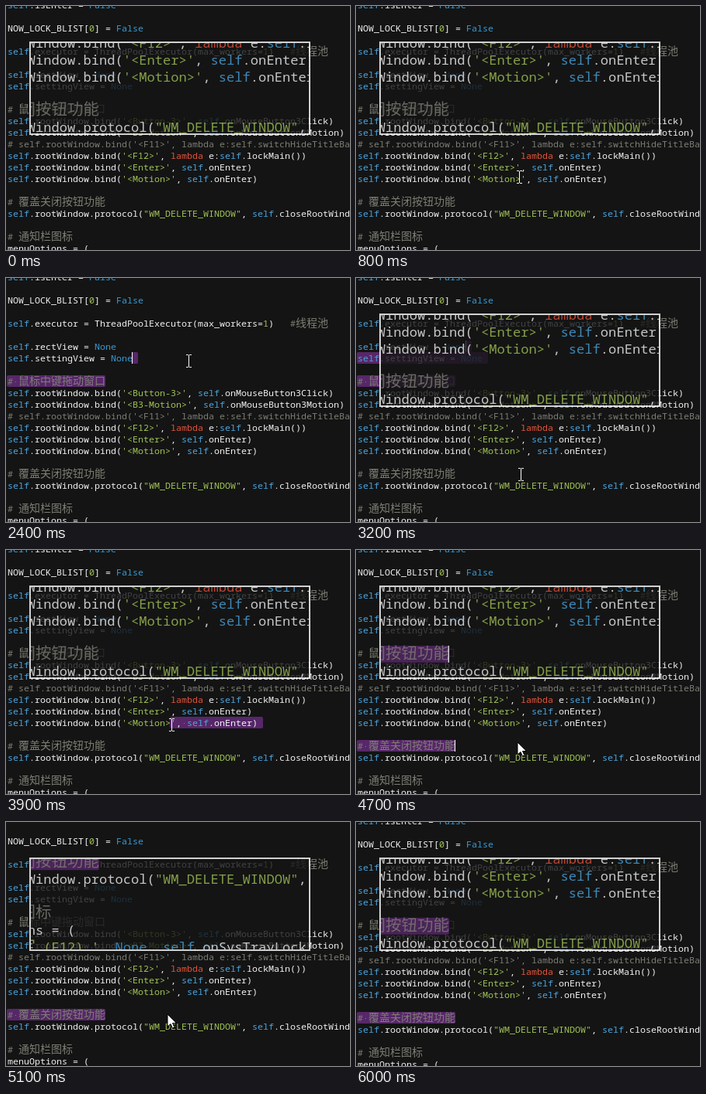
An HTML page with a canvas that plays this animation: 443x316 px, repeating every 6100 ms.

```html
<!DOCTYPE html>
<html lang="en">
<head>
<meta charset="utf-8">
<title>Editor with magnifier</title>
<style>
html, body { margin: 0; width: 100%; height: 100%; overflow: hidden; background: #141414; }
canvas { display: block; }
</style>
</head>
<body>
<canvas id="stage" width="443" height="316"></canvas>
<script>
const ctx = document.getElementById('stage').getContext('2d');
const W = 443, H = 316, LOOP = 6100, STEP = 100;
const COL = 7, ROW = 15, LEFT = 2, BG = '#141414', ZOOM = 1.465;
const LATIN = '11.667px "Noto Sans Mono", "DejaVu Sans Mono", monospace';
const HAN = '14px "Noto Sans CJK SC", "Noto Sans CJK", sans-serif';
const lines = `self.isEnter = False

NOW_LOCK_BLIST[0] = False

self.executor = ThreadPoolExecutor(max_workers=1)   #线程池

self.rectView = None
self.settingView = None

# 鼠标中键拖动窗口
self.rootWindow.bind('<Button-3>', self.onMouseButton3Click)
self.rootWindow.bind('<B3-Motion>', self.onMouseButton3Motion)
# self.rootWindow.bind('<F11>', lambda e:self.switchHideTitleBar())
self.rootWindow.bind('<F12>', lambda e:self.lockMain())
self.rootWindow.bind('<Enter>', self.onEnter)
self.rootWindow.bind('<Motion>', self.onEnter)

# 覆盖关闭按钮功能
self.rootWindow.protocol("WM_DELETE_WINDOW", self.closeRootWindow)

# 通知栏图标
menuOptions = (
    ('锁定 (F12).', None, self.onSysTrayLock),
    ('设置', None, self.onSysTraySetting),
    ('退出', None, self.closeRootWindow),
)`.split('\n');

// Groups: comment, string or number, self, lambda, constant
const TOKEN = /(#.*)|('[^']*'|"[^"]*"|\b\d+\b)|\b(self)\b|\b(lambda)\b|\b(None|False)\b|[^#'"\w]+|\w+/g;
const COLORS = ['#f2f2f2', '#7d7d74', '#a0c455', '#4aa5e0', '#e4533a', '#3a9ad4'];
const isWide = ch => ch > '\u2e80';
const cols = s => [...s].reduce((n, ch) => n + (isWide(ch) ? 2 : 1), 0);

// Each glyph with its grid column and colour
const glyphs = lines.map(line => {
  const out = [];
  let col = 0;
  for (const m of line.matchAll(TOKEN)) {
    const kind = m.slice(1).findIndex(Boolean) + 1;
    for (const ch of m[0]) {
      if (ch !== ' ') out.push({ ch, col, color: COLORS[kind] });
      col += cols(ch);
    }
  }
  return out;
});

// Timelines: [start, ...values], each held until the next entry
const scrolls = [[0, 0], [4800, 20], [4900, 44], [5000, 57], [5100, 4], [5200, 0]];
const lens = [[0, 1], [400, 0], [700, 1], [1000, 0], [3100, 1]];
const blink = [[0, 0], [1300, 1], [3400, 0], [4300, 1], [4900, 0], [5400, 1], [5900, 0]];
// caret line, caret column, anchor line, anchor column
const carets = [
  [0, 7, 23, 7, 23], [1700, 9, 18, 9, 18], [2200, 8, 0, 9, 18], [2300, 7, 23, 9, 18],
  [2600, 6, 20, 9, 18], [3400, 16, 0, 16, 0], [3900, 15, 30, 16, 0],
  [4000, 14, 30, 16, 0], [4200, 15, 30, 16, 0], [4300, 17, 18, 17, 0]
];
// x, y, shape
const mouse = [
  [0, 0, 0, ''], [200, 437, 46, 'beam'], [300, 404, 78, 'beam'], [400, 330, 100, 'beam'],
  [600, 270, 120, 'beam'], [700, 225, 190, 'beam'], [800, 210, 221, 'beam'],
  [900, 222, 180, 'beam'], [1000, 236, 115, 'beam'], [1100, 237, 97, 'beam'],
  [1500, 237, 128, 'beam'], [2200, 236, 119, 'beam'], [2300, 235, 107, 'beam'],
  [2600, 238, 91, 'beam'], [2800, 242, 100, 'beam'], [3000, 232, 150, 'beam'],
  [3100, 216, 210, 'beam'], [3200, 212, 254, 'beam'], [3400, 212, 250, 'beam'],
  [3500, 212, 243, 'beam'], [3600, 212, 239, 'beam'], [3800, 213, 234, 'beam'],
  [3900, 213, 226, 'beam'], [4000, 213, 212, 'beam'], [4200, 212, 238, 'beam'],
  [4300, 212, 255, 'beam'], [4600, 208, 249, 'arrow'], [5300, 250, 248, 'arrow'],
  [5400, 328, 247, 'arrow'], [5500, 0, 0, '']
];
const at = (keys, t) => keys.findLast(k => k[0] <= t).slice(1);
const midY = i => i * ROW - 1;

function drawSelection([l0, c0, l1, c1]) {
  for (let i = l0; i <= l1; i++) {
    const from = i === l0 ? c0 : 0;
    const to = i === l1 ? c1 : cols(lines[i]) + 1;
    if (!lines[i] || to <= from) continue;
    ctx.fillStyle = '#572769';
    ctx.beginPath();
    ctx.roundRect(LEFT + from * COL - 1, midY(i) - 8, (to - from) * COL + 1, ROW, 2);
    ctx.fill();
    // Selected spaces show as dots
    ctx.fillStyle = '#8f7a98';
    for (let c = from; c < to; c++) {
      if (lines[i][c] === ' ') ctx.fillRect(LEFT + c * COL + 3, midY(i), 1, 1);
    }
  }
}

function drawPage(t) {
  const [cl, cc, al, ac] = at(carets, t);
  ctx.fillStyle = BG;
  ctx.fillRect(0, 0, W, H);
  ctx.save();
  ctx.translate(0, -at(scrolls, t)[0]);
  drawSelection(cl < al ? [cl, cc, al, ac] : [al, ac, cl, cc]);
  glyphs.forEach((row, i) => {
    for (const g of row) {
      ctx.font = isWide(g.ch) ? HAN : LATIN;
      ctx.fillStyle = g.color;
      ctx.fillText(g.ch, LEFT + g.col * COL, midY(i) + 4);
    }
  });
  if (at(blink, t)[0]) {
    ctx.fillStyle = '#fff';
    ctx.fillRect(LEFT + cc * COL - 1, midY(cl) - 8, 1, ROW);
  }
  ctx.restore();
}

// The lens shows the page as it was one step earlier
function drawLens(t) {
  ctx.save();
  ctx.globalAlpha = 0.8;
  ctx.beginPath();
  ctx.rect(32, 48, 358, 117);
  ctx.save();
  ctx.clip();
  ctx.translate(-67.5, -236.5);
  ctx.scale(ZOOM, ZOOM);
  drawPage(Math.max(0, t - STEP));
  ctx.restore();
  ctx.strokeStyle = '#fff';
  ctx.lineWidth = 2;
  ctx.strokeRect(31, 47, 360, 119);
  ctx.restore();
}

function drawMouse([x, y, shape]) {
  if (!shape) return;
  ctx.save();
  ctx.translate(x, y);
  if (shape === 'beam') {
    ctx.fillStyle = '#fff';
    ctx.fillRect(0, -7, 1, 15);
    for (const dy of [-8, 8]) {
      ctx.fillRect(-3, dy, 3, 1);
      ctx.fillRect(1, dy, 3, 1);
    }
  } else {
    const arrow = new Path2D('M0 0V16L4 12.5L6.5 18L9 17L6.5 11.5H11.5Z');
    ctx.fillStyle = '#fff';
    ctx.strokeStyle = '#000';
    ctx.fill(arrow);
    ctx.stroke(arrow);
  }
  ctx.restore();
}

function frame(now) {
  const t = Math.floor((now % LOOP) / STEP) * STEP;
  drawPage(t);
  if (at(lens, t)[0]) drawLens(t);
  drawMouse(at(mouse, t));
  requestAnimationFrame(frame);
}
requestAnimationFrame(frame);
</script>
</body>
</html>
```
